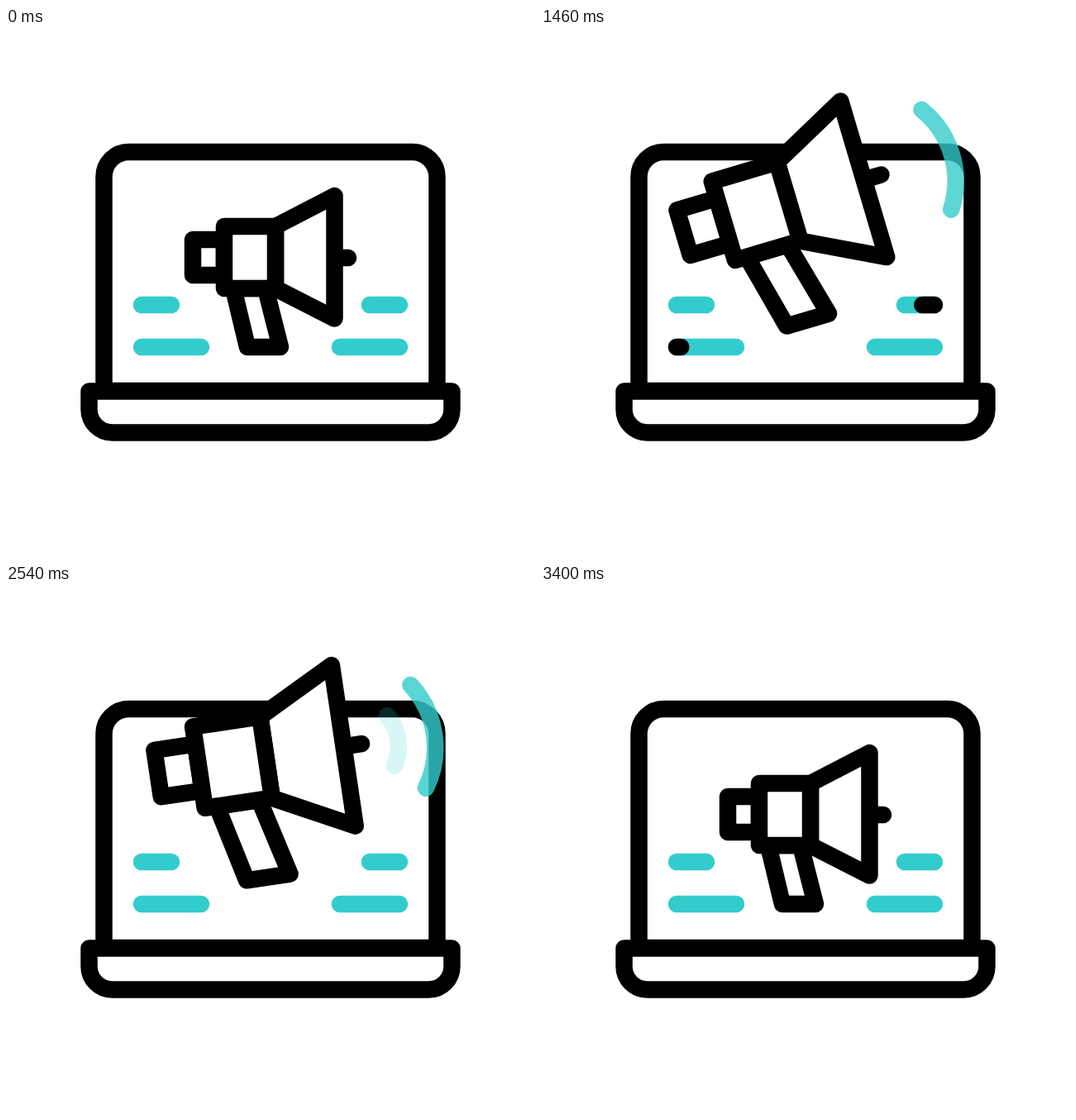
Write an HTML page that moves like this. It is 640 px wide and 640 px high and loops after 3600 ms.

```html
<!DOCTYPE html>
<html lang="en">
<head>
<meta charset="utf-8">
<title>Laptop megaphone</title>
<style>
  html, body { margin: 0; width: 100%; height: 100%; overflow: hidden; background: #fff; }
  svg { display: block; width: 100vw; height: 100vh; }
  path { fill: none; stroke: #000; stroke-width: 20.5; stroke-linecap: round; stroke-linejoin: round; }
  .solid path { fill: #fff; }
  #horn path { vector-effect: non-scaling-stroke; }
  .teal { stroke: #33cccc; }
</style>
</head>
<body>
<svg viewBox="0 0 640 640">
  <g id="scene">
    <g class="solid">
      <path d="M118.5 439V180a30 30 0 0 1 30-30H491.5a30 30 0 0 1 30 30V439z"/>
      <path d="M100.5 439.5H539.5V461.5a28 28 0 0 1-28 28H128.5a28 28 0 0 1-28-28z"/>
    </g>
    <g id="bars"></g>
    <g id="waves">
      <path id="near" class="teal" d="M165.5-135.2A58 58 0 0 1 165.5-73.8"/>
      <path id="far" class="teal" d="M199-167.5A111 111 0 0 1 199-41.5"/>
    </g>
    <g id="horn" class="solid">
      <path d="M397.5 278H414"/>
      <path d="M275 315L292 386H332L314 315z"/>
      <path d="M226 256H264V299H226z"/>
      <path d="M326 240L397.5 203V351.5L326 315z"/>
      <path d="M264 240H326V315H264z"/>
    </g>
  </g>
</svg>
<script>
const LOOP = 3600;
const ENTER = 220, EXIT = 3007, MOVE = 383;
const WAVE_START = 433, WAVE_END = 3400, WAVE_PERIOD = 600;
const SWING_PERIOD = 1000 / 6;
const SWEEP = 400;

const byId = id => document.getElementById(id);
const clamp = x => Math.min(1, Math.max(0, x));
const mix = (a, b, p) => a + (b - a) * p;
const ease = x => (1 - Math.cos(Math.PI * clamp(x))) / 2;

const scene = byId('scene'), horn = byId('horn'), waves = byId('waves');
const near = byId('near'), far = byId('far');

function addPath(d, className) {
  const path = document.createElementNS('http://www.w3.org/2000/svg', 'path');
  path.setAttribute('d', d);
  path.setAttribute('class', className);
  byId('bars').append(path);
  return path;
}

// left end, height, length, sweep start
const bars = [
  [164, 335, 36, 605],
  [440, 335, 36, 838],
  [164, 386, 72, 1391],
  [404, 386, 72, 1644]
].map(([x, y, length, start]) => {
  addPath(`M${x} ${y}h${length}`, 'teal');
  return { x, y, length, start, sweep: addPath('', 'sweep') };
});

function drawBar({ x, y, length, start, sweep }, t) {
  const head = ease((t - start) / SWEEP);
  const tail = ease((t - start - SWEEP) / SWEEP);
  const visible = head > tail;
  sweep.setAttribute('visibility', visible ? 'visible' : 'hidden');
  if (visible) sweep.setAttribute('d', `M${x + tail * length} ${y}H${x + head * length}`);
}

// Ramps up for 133 ms, holds for 67 ms, ramps down for 133 ms
function pulse(t, center) {
  const active = t >= WAVE_START && t < WAVE_END;
  const phase = (t - WAVE_START) % WAVE_PERIOD;
  return active ? clamp((500 / 3 - Math.abs(phase - center)) / (400 / 3)) : 0;
}

function drawHorn(t) {
  const lift = ease((t - ENTER) / MOVE) - ease((t - EXIT) / MOVE);
  const swing = 12.4 - 4.2 * Math.cos(2 * Math.PI * (t - 50) / SWING_PERIOD);
  const x = mix(316, 317.2, lift) - 16 * lift * (1 - lift);
  const y = mix(358, 316, lift);
  const turn = `rotate(${-swing * lift})`;
  const scale = mix(1, 1.325, lift);
  horn.setAttribute('transform', `translate(${x} ${y}) ${turn} scale(${scale}) translate(-316 -358)`);
  waves.setAttribute('transform', `translate(${x} ${y + 24 * (1 - lift)}) ${turn}`);
  near.setAttribute('opacity', pulse(t, 500 / 3));
  far.setAttribute('opacity', pulse(t, 1100 / 3));
}

function drawTilt(t) {
  const tilt = Math.max(0, Math.sin(Math.PI * clamp((t - EXIT) / MOVE))) ** 1.5;
  scene.setAttribute('transform',
    `translate(${-18.8 * tilt} ${-43.4 * tilt}) rotate(${-5.46 * tilt} 320 439)`);
}

function draw(t) {
  bars.forEach(bar => drawBar(bar, t));
  drawHorn(t);
  drawTilt(t);
}

const begin = performance.now();
function tick() {
  draw((performance.now() - begin) % LOOP);
  requestAnimationFrame(tick);
}
tick();
</script>
</body>
</html>
```
